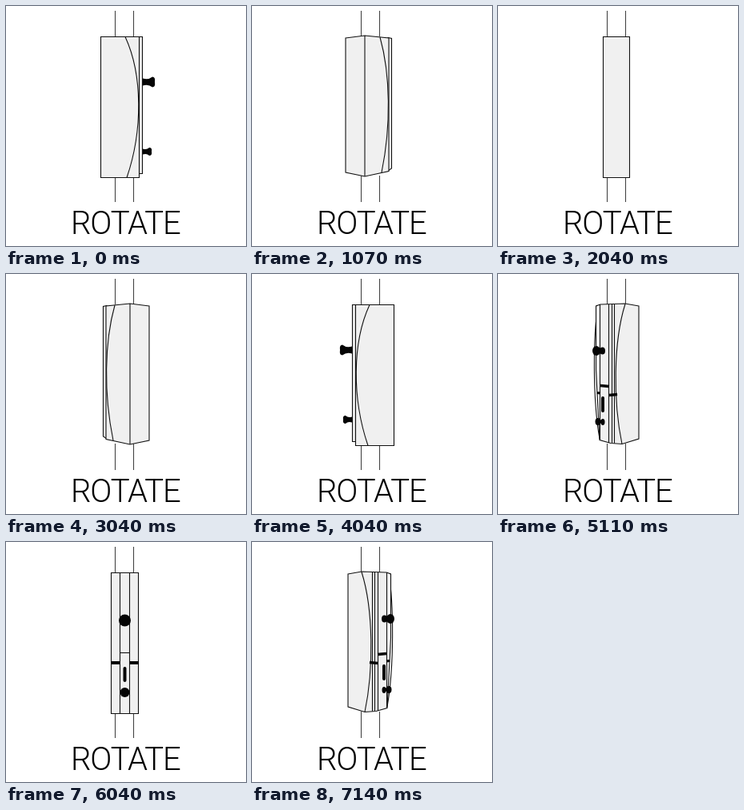
Write an HTML page with a canvas that moves like this. It is 300 by 300 pixels and loops after 8.11 s.

```html
<!DOCTYPE html>
<html lang="en">
<head>
<meta charset="utf-8">
<title>Rotate</title>
<style>
html, body { margin: 0; width: 100%; height: 100%; overflow: hidden; background: #fff; }
canvas { display: block; width: 100vw; height: 100vh; }
</style>
</head>
<body>
<canvas id="stage" width="300" height="300"></canvas>
<script>
const ctx = document.getElementById('stage').getContext('2d');
const INK = '#111', FILL = '#f0f0f0', BLACK = '#050505';
const LOOP = 8110;
const AXIS = 148;

function line(...pts) {
  ctx.beginPath();
  for (let i = 0; i < pts.length; i += 2) ctx.lineTo(pts[i], pts[i + 1]);
  ctx.stroke();
}

function poly(...pts) {
  ctx.beginPath();
  for (let i = 0; i < pts.length; i += 2) ctx.lineTo(pts[i], pts[i + 1]);
  ctx.closePath();
  ctx.fill();
  ctx.stroke();
}

function curve(x0, y0, x1, y1, x2, y2, x3, y3) {
  ctx.beginPath();
  ctx.moveTo(x0, y0);
  ctx.bezierCurveTo(x1, y1, x2, y2, x3, y3);
  ctx.stroke();
}

function dot(x, y, rx, ry = rx) {
  ctx.fillStyle = BLACK;
  ctx.beginPath();
  ctx.ellipse(x, y, rx, ry, 0, 0, Math.PI * 2);
  ctx.fill();
  ctx.fillStyle = FILL;
}

function bar(x0, y0, x1, y1, width, cap = 'butt') {
  ctx.save();
  ctx.strokeStyle = BLACK;
  ctx.lineWidth = width;
  ctx.lineCap = cap;
  line(x0, y0, x1, y1);
  ctx.restore();
}

// Flared knob seen from the side
function knob(x, y, len, r) {
  ctx.fillStyle = BLACK;
  ctx.beginPath();
  ctx.moveTo(x, y - r * 0.7);
  ctx.quadraticCurveTo(x + len * 0.45, y - r * 0.35, x + len - 3, y - r);
  ctx.quadraticCurveTo(x + len + 1, y - r, x + len, y);
  ctx.quadraticCurveTo(x + len + 1, y + r, x + len - 3, y + r);
  ctx.quadraticCurveTo(x + len * 0.45, y + r * 0.35, x, y + r * 0.7);
  ctx.fill();
  ctx.fillStyle = FILL;
}

function wires() {
  ctx.strokeStyle = '#444';
  for (const x of [136.5, 159.5]) {
    line(x, 6, x, 38);
    line(x, 212, x, 245);
  }
  ctx.strokeStyle = INK;
}

function side() {
  poly(166.5, 38.5, 170.5, 38.5, 170.5, 209.5, 166.5, 209.5);
  poly(118.5, 38.5, 166.5, 38.5, 166.5, 214.5, 118.5, 214.5);
  curve(149, 38.5, 171, 86, 171, 156, 151, 214.5);
  knob(171, 95, 15, 6.5);
  knob(171, 182, 11, 5);
}

function backAngle() {
  poly(170, 39.5, 174.5, 40.5, 174.5, 203, 170, 206);
  poly(117, 40, 141, 37, 171, 40, 171, 206.5, 141, 213, 117, 208);
  line(141, 37, 141, 213);
  curve(160, 39, 173, 85, 174, 150, 162, 208);
}

function back() {
  poly(131.5, 38.5, 164.5, 38.5, 164.5, 214.5, 131.5, 214.5);
}

function front() {
  poly(131.5, 38.5, 165.5, 38.5, 165.5, 214.5, 131.5, 214.5);
  line(142.5, 38.5, 142.5, 214.5);
  line(154.5, 38.5, 154.5, 214.5);
  line(142.5, 138.5, 154.5, 138.5);
  bar(131, 151, 142, 151, 4);
  bar(155, 151, 166, 151, 4);
  bar(148.5, 158, 148.5, 173, 4, 'round');
  dot(148.5, 98, 7.5);
  dot(148.5, 188, 6);
}

function frontAngle() {
  curve(171, 40, 177, 75, 178, 155, 169, 206);
  poly(120, 40, 137, 37, 168, 38, 173.5, 40, 173.5, 120, 169, 207.5, 155, 211.5, 141, 212.5, 120, 206);
  curve(137, 37.5, 152, 85, 152, 160, 141, 212.5);
  line(150.5, 38, 150.5, 211.5);
  line(153.5, 38, 153.5, 211.5);
  line(157.5, 38, 157.5, 211);
  line(168.5, 38, 168.5, 207);
  bar(147, 150.5, 157, 151.5, 3.5);
  bar(157, 140.5, 168, 139.5, 3.5);
  bar(168, 149, 172, 148.5, 3);
  bar(165, 155, 165, 171, 4, 'round');
  bar(165, 96, 173, 96, 6);
  dot(165.5, 96, 3.5, 4.5);
  dot(173, 96, 5, 6);
  bar(165, 184.5, 171, 184.5, 4);
  dot(165, 185, 2.5, 4);
  dot(171, 184.5, 3.5, 4.5);
}

const mirrored = pose => () => {
  ctx.save();
  ctx.translate(AXIS * 2, 0);
  ctx.scale(-1, 1);
  pose();
  ctx.restore();
};

const poses = [
  [0, side], [1070, backAngle], [2040, back], [3040, mirrored(backAngle)],
  [4040, mirrored(side)], [5110, mirrored(frontAngle)], [6040, front], [7140, frontAngle]
];

function label() {
  const text = 'ROTATE', left = 84, inkWidth = 134;
  ctx.fillStyle = '#000';
  ctx.font = '300 40px Roboto, "Liberation Sans", sans-serif';
  ctx.fontStretch = 'semi-condensed';
  ctx.letterSpacing = '0px';
  const m = ctx.measureText(text);
  const ink = m.actualBoundingBoxLeft + m.actualBoundingBoxRight;
  ctx.letterSpacing = (inkWidth - ink) / (text.length - 1) + 'px';
  ctx.fillText(text, left + m.actualBoundingBoxLeft, 285);
}

function draw(t) {
  ctx.fillStyle = '#fff';
  ctx.fillRect(0, 0, 300, 300);
  ctx.lineWidth = 1.1;
  ctx.lineJoin = 'miter';
  label();
  ctx.fillStyle = FILL;
  wires();
  poses.findLast(([start]) => t >= start)[1]();
}

const begin = performance.now();
function tick() {
  draw((performance.now() - begin) % LOOP);
  requestAnimationFrame(tick);
}
tick();
</script>
</body>
</html>
```
